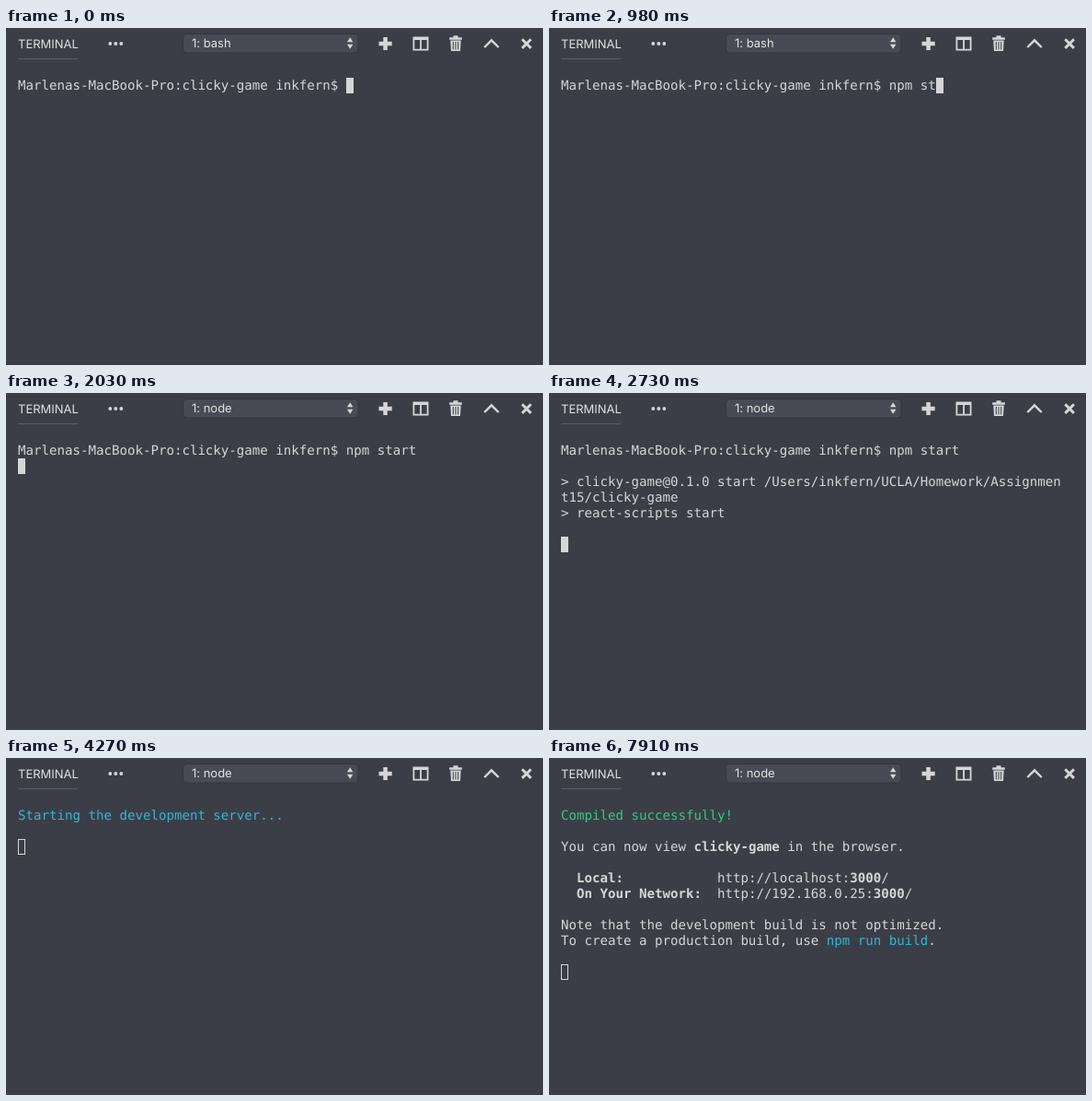
An HTML page for the animation above (8260 ms loop, 584x366 px).

```html
<!DOCTYPE html>
<html lang="en">
<head>
<meta charset="utf-8">
<title>Terminal</title>
<style>
  html, body { margin: 0; width: 100%; height: 100%; overflow: hidden; background: #3c3e47; }
  #stage { position: relative; width: 584px; height: 366px; overflow: hidden; color: #d6d6d8; text-rendering: geometricPrecision; }
  #bar { position: absolute; left: 0; top: 0; }
  #bar text { font: 13px Inter, Roboto, sans-serif; fill: #e2e2e4; }
  #screen { position: absolute; left: 13px; top: 54px; font: 14.118px/17px "DejaVu Sans Mono", "Liberation Mono", monospace; white-space: pre; }
  #lines { position: relative; top: 1px; }
  #cursor { position: absolute; box-sizing: border-box; width: 8px; height: 17px; background: #d6d6d8; }
  #cursor.hollow { background: none; border: 1px solid #d6d6d8; }
  .cyan { color: #35b5d3; }
  .green { color: #35c78b; }
</style>
</head>
<body>
<div id="stage">
  <svg id="bar" width="584" height="40" viewBox="0 0 584 40">
    <text x="13" y="22">TERMINAL</text>
    <rect x="13" y="33" width="65" height="1" fill="#5b5e67"/>
    <g fill="#d6d6d8">
      <circle cx="113.3" cy="17" r="1.9"/><circle cx="119.3" cy="17" r="1.9"/><circle cx="125.3" cy="17" r="1.9"/>
    </g>
    <rect x="192.5" y="6.5" width="190.5" height="20.5" rx="4" fill="#484b56" stroke="#33353e"/>
    <text id="shell" x="202" y="21">1: bash</text>
    <g fill="#d6d6d8">
      <path d="M371 15.3L374.2 10.3L377.4 15.3ZM371 17.8L374.2 22.8L377.4 17.8Z"/>
      <path d="M410.3 10h4.5v4.7h4.9v4.5h-4.9v4.8h-4.5v-4.8h-4.8v-4.5h4.8Z"/>
      <path fill-rule="evenodd" d="M442.5 9.5h17v15h-17ZM444.3 13v9.7h5.9v-9.7ZM452 13v9.7h5.7v-9.7Z"/>
      <path fill-rule="evenodd" d="M486.5 10.2v-1.9h5v1.9h4.3v2.6h-13.6v-2.6ZM483.3 13.6h11.4l-.7 11.4h-10ZM485.8 15v8.5h1v-8.5ZM488.5 15v8.5h1v-8.5ZM491.2 15v8.5h1v-8.5Z"/>
    </g>
    <g fill="none" stroke="#d6d6d8">
      <path d="M520.3 21L528 13.3L535.7 21" stroke-width="2.4"/>
      <path d="M561.3 12.3L570.9 21.9M570.9 12.3L561.3 21.9" stroke-width="2.9"/>
    </g>
  </svg>
  <div id="screen"><div id="lines"></div><div id="cursor"></div></div>
</div>
<script>
const LOOP = 8260, COL = 8.5, ROW = 17;
const prompt = "Marlenas-MacBook-Pro:clicky-game inkfern$ ";
const command = "npm start";

const started = prompt + command + `

&gt; clicky-game@0.1.0 start /Users/inkfern/UCLA/Homework/Assignmen
t15/clicky-game
&gt; react-scripts start`;

const starting = '<span class="cyan">Starting the development server...</span>';

const compiled = `<span class="green">Compiled successfully!</span>

You can now view <b>clicky-game</b> in the browser.

  <b>Local:</b>            http://localhost:<b>3000</b>/
  <b>On Your Network:</b>  http://192.168.0.25:<b>3000</b>/

Note that the development build is not optimized.
To create a production build, use <span class="cyan">npm run build</span>.`;

// one keystroke per entry
const keys = [140, 350, 490, 630, 840, 980, 1120, 1260, 1540];
const typed = n => ({ shell: "bash", text: prompt + command.slice(0, n), row: 0, col: prompt.length + n });

const steps = [
  { at: 0, ...typed(0) },
  ...keys.map((at, i) => ({ at, ...typed(i + 1) })),
  { at: 1960, shell: "bash", text: prompt + command, row: 1 },
  { at: 2030, shell: "node", text: prompt + command, row: 1 },
  { at: 2240, shell: "node", text: started, row: 6 },
  { at: 3920, shell: "node", text: starting, row: 2 },
  { at: 4270, shell: "node", text: starting, row: 2, hollow: true },
  { at: 7630, shell: "node", text: compiled, row: 10, hollow: true }
];

const [shell, lines, cursor] = ["shell", "lines", "cursor"].map(id => document.getElementById(id));
let shown;

function show(step) {
  if (step === shown) return;
  shown = step;
  shell.textContent = "1: " + step.shell;
  lines.innerHTML = step.text;
  cursor.style.left = (step.col || 0) * COL + "px";
  cursor.style.top = step.row * ROW + "px";
  cursor.className = step.hollow ? "hollow" : "";
}

const start = performance.now();
function tick() {
  const t = (performance.now() - start) % LOOP;
  show(steps.findLast(s => s.at <= t));
  requestAnimationFrame(tick);
}
tick();
</script>
</body>
</html>
```
